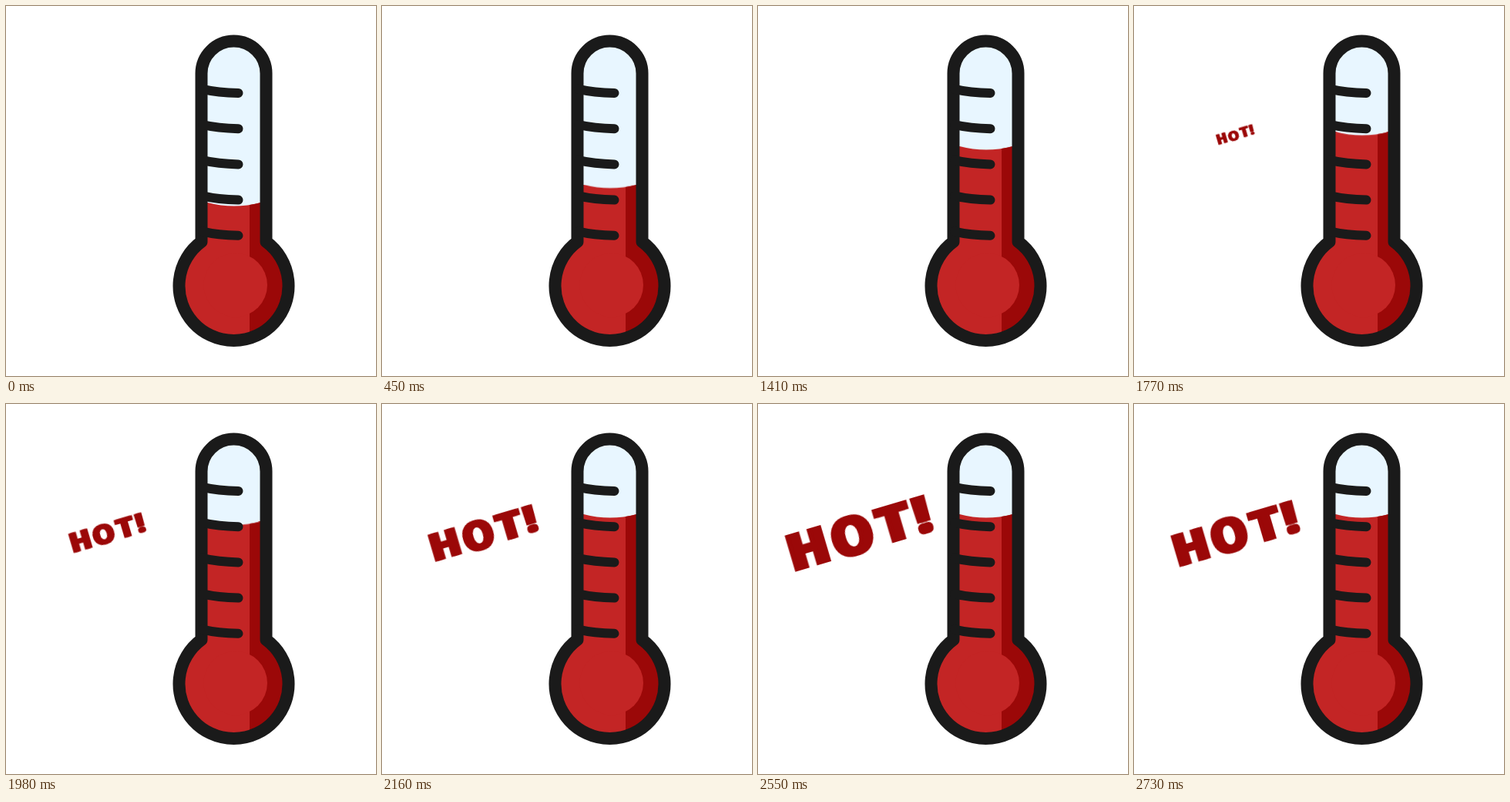
Animation of 480 by 480 pixels, one loop 3.6 s. Source, as an HTML page:

```html
<!DOCTYPE html>
<html lang="en">
<head>
<meta charset="utf-8">
<title>Hot thermometer</title>
<style>
  html, body { margin: 0; width: 100%; height: 100%; overflow: hidden; background: #fff; }
  svg { display: block; width: 100%; height: 100%; }

  .outline { fill: none; stroke: #1a1a1a; stroke-linecap: round; stroke-linejoin: round; }
  .glass { fill: #e8f6ff; }
  .red { fill: #c32525; }
  .shade { fill: #9b0808; }

  .word {
    font: 900 67px Inter, "Noto Sans", sans-serif;
    text-anchor: middle;
    fill: #9b0808;
    stroke: #9b0808;
    stroke-width: 2px;
  }
  .round { font-size: 72px; font-weight: 800; }

  /* The picture advances in 30 ms ticks: one step per tick. */
  .level { animation: rise 3600ms infinite; }
  .pop { animation: pop 3600ms infinite; }

  @keyframes rise {
    0% { transform: translateY(0); animation-timing-function: steps(72); }
    60%, 100% { transform: translateY(-112px); }
  }
  @keyframes pop {
    0% { transform: scale(0); }
    43.3333% { transform: scale(0); animation-timing-function: steps(29); }
    67.5% { transform: scale(1.036); animation-timing-function: steps(10); }
    75.8333%, 100% { transform: scale(.832); }
  }
</style>
</head>
<body>
<svg viewBox="0 0 480 480">
  <defs>
    <path id="body" d="M253.5 305.8V87.5a42 42 0 0 1 84 0V305.8A71 71 0 1 1 253.5 305.8Z"/>
    <path id="tick" d="M255 107.8q20 4.7 46.5 5.2"/>
    <clipPath id="inside"><use href="#body"/></clipPath>
    <clipPath id="right"><rect x="316" width="60" height="700"/></clipPath>
    <path id="liquid" d="M200 255H261.5Q296 264 330.5 255H400V600H200Z"/>
  </defs>

  <use href="#body" class="glass"/>
  <g clip-path="url(#inside)">
    <g class="level">
      <use href="#liquid" class="red"/>
      <use href="#liquid" class="shade" clip-path="url(#right)"/>
    </g>
    <circle class="red" cx="297.7" cy="362" r="41.3"/>
  </g>

  <use href="#body" class="outline" stroke-width="16"/>
  <g class="outline" stroke-width="12">
    <use href="#tick"/>
    <use href="#tick" y="46.2"/>
    <use href="#tick" y="92.4"/>
    <use href="#tick" y="138.6"/>
    <use href="#tick" y="184.8"/>
  </g>

  <g transform="translate(131.5 167) rotate(-16.5)">
    <g class="pop">
      <!-- Two overlapping copies make the upright strokes heavier. -->
      <text id="word" class="word" x="-75.5 -13 46.5 86" y="25.5 27.5 25.5 25.5">H<tspan class="round">O</tspan>T!</text>
      <use href="#word" x="5"/>
    </g>
  </g>
</svg>
</body>
</html>
```
